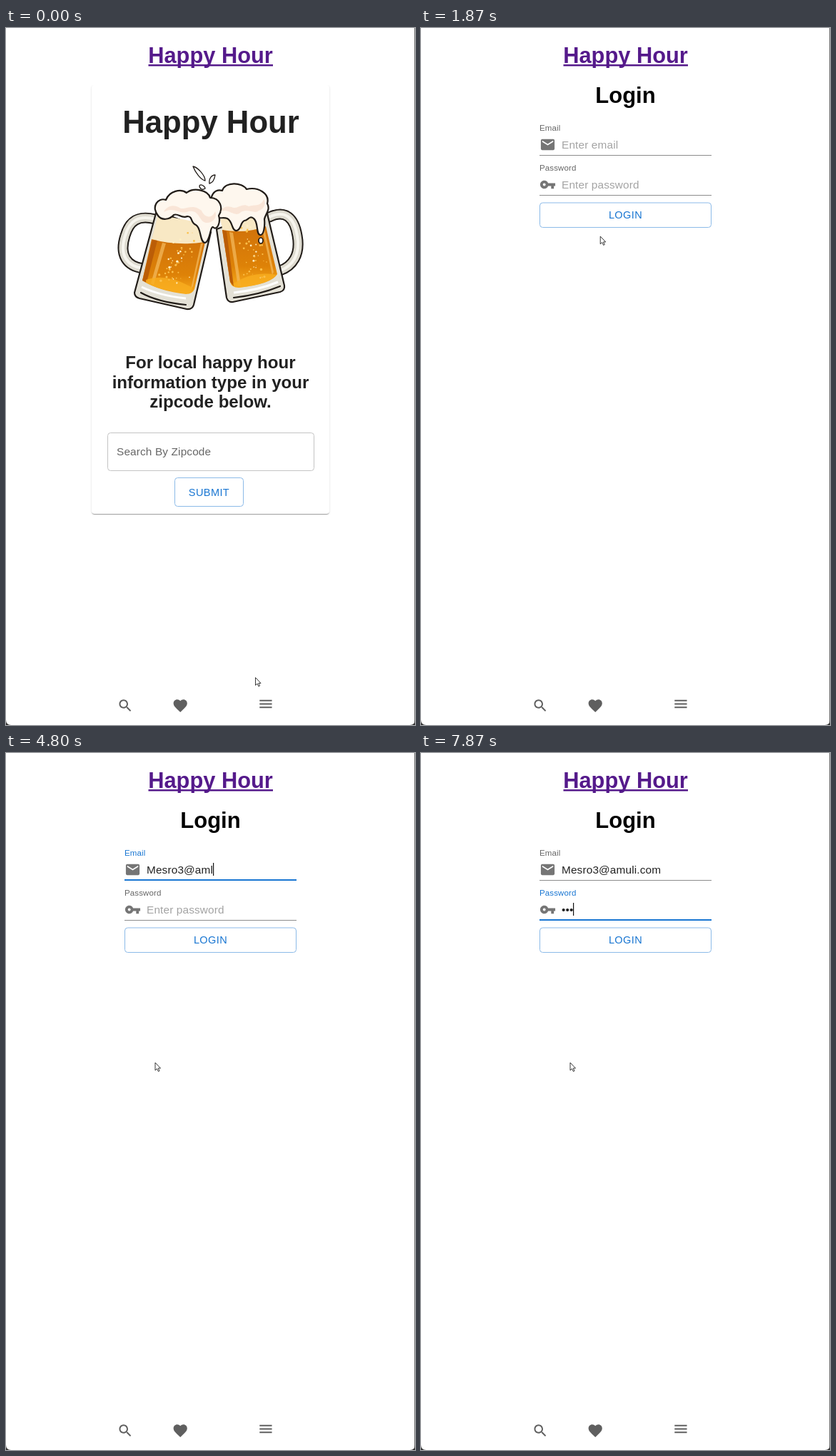
Write an HTML page that moves like this. It is 573 by 977 pixels and loops after 8000 ms.

```html
<!DOCTYPE html>
<html lang="en">
<head>
<meta charset="utf-8">
<title>Happy Hour</title>
<style>
html, body { margin: 0; width: 100%; height: 100%; overflow: hidden; background: #fff; }
svg { position: absolute; left: 0; top: 0; display: block; }
text { font-family: "Liberation Sans", Arial, sans-serif; white-space: pre; }
.bold { font-weight: 700; text-anchor: middle; }
.input { font-size: 15.36px; letter-spacing: .00938em; }
.label { font-size: 11.52px; letter-spacing: .00938em; }
.btn { font-size: 14.5px; letter-spacing: .02857em; text-anchor: middle; fill: #1976d2; }
.ui { font-family: "Open Sans", "Noto Sans", sans-serif; fill: #fff; }
.box { fill: none; stroke: #8cbae8; }
.ink { stroke: #211c18; stroke-width: 2.2; stroke-linejoin: round; stroke-linecap: round; }
#card { position: absolute; left: 120px; top: 80px; width: 333px; height: 601px; border-radius: 4px;
  box-shadow: 0 2px 1px -1px rgba(0,0,0,.2), 0 1px 1px rgba(0,0,0,.14), 0 1px 3px rgba(0,0,0,.12); }
#cover { position: absolute; left: 110px; top: 70px; width: 353px; height: 10px; background: #fff; }
</style>
</head>
<body>
<div id="home"><div id="card"></div><div id="cover"></div></div>
<svg id="stage" width="573" height="977" viewBox="0 0 573 977">
  <defs>
    <linearGradient id="beer" x1="0" y1="0" x2="0" y2="1">
      <stop offset="0" stop-color="#d0720a"/><stop offset=".65" stop-color="#de8207"/><stop offset="1" stop-color="#f8ab1c"/>
    </linearGradient>
    <filter id="drop" x="-10%" y="-10%" width="120%" height="125%">
      <feDropShadow dx="0" dy="2" stdDeviation="2" flood-opacity=".35"/>
    </filter>
  </defs>

  <text class="bold" x="286.5" y="49" font-size="30.8" fill="#551a8b">Happy Hour</text>
  <path d="M199.5 52.3H374" stroke="#551a8b" stroke-width="2.6"/>

  <g id="homeArt">
    <text class="bold" x="287" y="147" font-size="43.7" fill="#212121">Happy Hour</text>
    <g class="ink" fill="#fff" stroke-width="1.6">
      <path d="M262 194C268 195 279 206 279 214C273 213 265 202 262 194ZM285 218C284 211 288 206 293 206C292 213 289 217 285 218ZM271 221C273 218 279 222 279 225C275 228 271 225 271 221Z" style="stroke-width:1.3"/>
    </g>

    <g fill="none" stroke-linecap="round">
      <g id="handles"></g>
    </g>

    <!-- left glass -->
    <path class="ink" fill="#e4e1d6" d="M211 256L180 371Q180 377 187 379L253 394Q261 395 263 388L287 286Z"/>
    <path fill="#f8e8c4" d="M213 262L204 297Q240 306 278 301L284 275Z"/>
    <path fill="url(#beer)" d="M204 296Q240 306 279 300L264 366Q261 373 252 373Q215 369 191 354Z"/>
    <path fill="#bb5d07" d="M205 297L212 298L197 357L191 354Z"/>
    <path fill="#f3b85b" d="M219 301L224 302L207 360L203 358ZM273 302L276 302L262 362L259 366Z" opacity=".75"/>
    <path fill="#f9ae20" d="M196 353Q225 343 261 364Q259 373 250 372Q214 367 196 357Z" opacity=".8"/>
    <path fill="none" stroke="#fff" stroke-width="3" d="M190 363Q215 375 252 379"/>
    <path fill="none" class="ink" d="M189 371Q212 384 252 388"/>

    <!-- right glass -->
    <path class="ink" fill="#e4e1d6" d="M295 282L309 378Q311 385 318 384L384 370Q391 368 390 361L365 256Z"/>
    <path fill="#f8e8c4" d="M300 268L304 285Q335 289 362 279L360 258Z"/>
    <path fill="url(#beer)" d="M303 283Q335 289 364 278L380 345Q372 359 326 364Q316 364 314 356Z"/>
    <path fill="#bb5d07" d="M303 283L309 285L319 362L314 356Z"/>
    <path fill="#f3b85b" d="M313 286L318 287L329 361L325 362ZM359 282L362 281L375 342L373 346Z" opacity=".75"/>
    <path fill="#f9ae20" d="M318 359Q345 340 379 346Q370 359 326 364Z" opacity=".8"/>
    <path fill="none" stroke="#fff" stroke-width="3" d="M319 371Q355 367 381 356"/>
    <path fill="none" class="ink" d="M319 378Q355 374 384 362"/>
    <g id="bubbles"></g>

    <!-- foam -->
    <path class="ink" fill="#fef7ee" d="M289 262C282 240 290 224 303 228C307 215 331 216 337 226C353 222 370 232 366 246C371 255 363 261 362 268C363 278 361 291 356 290C350 289 354 272 347 267C341 262 339 270 334 270C328 272 330 283 323 284C316 285 318 271 310 267C303 264 297 270 289 262Z"/>
    <path class="ink" fill="#fef7ee" d="M213 263C203 250 213 237 224 241C229 228 245 225 253 231C263 223 283 227 286 238C300 238 305 252 298 263C301 272 296 285 290 279C286 278 286 299 279 301C271 301 274 280 266 276C258 273 262 264 254 264C246 268 241 259 235 262C229 269 218 270 213 263Z"/>
    <path fill="#f8dfce" d="M221 258C235 249 244 263 256 257C271 254 270 271 280 273C292 274 296 263 293 257C289 268 278 266 274 256C262 246 253 254 245 253C236 246 225 249 221 258ZM301 258C310 251 320 266 328 259C338 251 348 262 354 256C365 253 363 241 361 240C357 251 348 247 340 250C331 244 324 255 316 251C309 249 303 251 301 258Z" opacity=".7"/>
    <ellipse class="ink" fill="#fff" cx="357" cy="298" rx="3" ry="4" style="stroke-width:1.7"/>

    <g class="bold" font-size="24.1" fill="#212121">
      <text x="286.5" y="477">For local happy hour</text>
      <text x="286.5" y="504.7">information type in your</text>
      <text x="286.5" y="532.4">zipcode below.</text>
    </g>
    <rect class="box" x="142.5" y="567.5" width="289" height="53" rx="4" style="stroke:#c4c4c4"/>
    <text class="input" x="155" y="599" fill="#666">Search By Zipcode</text>
    <rect class="box" x="236.5" y="630.5" width="96" height="40" rx="4"/>
    <text class="btn" x="284.5" y="656">SUBMIT</text>
  </g>

  <g id="login">
    <text class="bold" x="286.5" y="105" font-size="31" fill="#000">Login</text>
    <g fill="#757575">
      <path transform="translate(166 152) scale(.96)" d="M20 4H4c-1.1 0-2 .9-2 2v12c0 1.1.9 2 2 2h16c1.1 0 2-.9 2-2V6c0-1.1-.9-2-2-2zm0 4l-8 5-8-5V6l8 5 8-5z"/>
      <path transform="translate(166 208) scale(.96)" d="M12.65 10C11.83 7.67 9.61 6 7 6c-3.31 0-6 2.69-6 6s2.69 6 6 6c2.61 0 4.83-1.67 5.65-4H17v4h4v-4h2v-4zM7 14c-1.1 0-2-.9-2-2s.9-2 2-2 2 .9 2 2-.9 2-2 2z"/>
    </g>
    <text class="label" id="emailLabel" x="166" y="144">Email</text>
    <text class="label" id="passLabel" x="166" y="200">Password</text>
    <text class="input" id="email" x="197" y="169"></text>
    <text class="input" id="pass" x="197" y="225"></text>
    <rect id="emailLine" x="166" width="241"/>
    <rect id="passLine" x="166" width="241"/>
    <rect id="caret" width="1.2" height="18" fill="#111"/>
    <rect class="box" x="166.5" y="245" width="240" height="34.5" rx="4"/>
    <text class="btn" x="286.5" y="266.5">LOGIN</text>
  </g>

  <g id="list">
    <g fill="#292a2b" filter="url(#drop)">
      <path d="M294 188L302.5 180L311 188Z"/>
      <rect id="panel" x="282" y="187.5" width="150" rx="4"/>
    </g>
    <g id="rows"></g>
  </g>

  <g fill="#5f5f5f">
    <path transform="translate(155.6 938.4) scale(.96)" d="M15.5 14h-.79l-.28-.27C15.41 12.59 16 11.11 16 9.5 16 5.91 13.09 3 9.5 3S3 5.91 3 9.5 5.91 16 9.5 16c1.61 0 3.09-.59 4.23-1.57l.27.28v.79l5 4.99L20.49 19zm-6 0C7.01 14 5 11.99 5 9.5S7.01 5 9.5 5 14 7.01 14 9.5 11.99 14 9.5 14z"/>
    <path transform="translate(232.7 938.4) scale(.96)" d="M12 21.35l-1.45-1.32C5.4 15.36 2 12.28 2 8.5 2 5.42 4.42 3 7.5 3c1.74 0 3.41.81 4.5 2.09C13.09 3.81 14.76 3 16.5 3 19.58 3 22 5.42 22 8.5c0 3.78-3.4 6.86-8.55 11.54z"/>
    <path transform="translate(352.4 936) scale(.96)" d="M3 18h18v-2H3zm0-5h18v-2H3zm0-7v2h18V6z"/>
  </g>

  <path d="M572.5 0V977" stroke="#777"/>
  <path d="M0 970Q0 977 7 977H0ZM573 970Q573 977 566 977H573Z" fill="#333"/>
  <g id="status">
    <path d="M0 956H111Q116 956 116 961V977H0Z" fill="#000"/>
    <text class="ui" x="4" y="971" font-size="11.1">localhost:3000/login</text>
  </g>
  <path id="mouse" d="M.5 .5V11.3L3 9L4.9 12.9L6.5 12.1L4.8 8.4H8Z" fill="#fff" stroke="#222" stroke-width=".9"/>
</svg>
<script>
const LOOP = 8000, SWITCH = 1130, FOCUS = 2130, TAB = 7330, LAG = 60;
const $ = id => document.getElementById(id);
const set = (id, attrs) => { for (const k in attrs) $(id).setAttribute(k, attrs[k]); };
const show = (id, on) => { $(id).style.display = on ? '' : 'none'; };

const NAMES = ['7', 'Mesro2', 'Mesro1', 'leso1', 'Vebu1', 'Mesro3'].map(n => n + '@amuli.com');

// typed characters with the time of each; "<" is backspace
const KEYS = 'Mesro3@amlui.co<<<<<<uli.com';
const TIMES = [3000, 3330, 3400, 3670, 3730, 4070, 4270, 4530, 4600, 4730, 4870, 4930, 5070, 5200, 5330,
  5530, 5730, 5930, 6130, 6270, 6330, 6530, 6600, 6730, 6870, 6930, 7070, 7200];
const DOTS = [7600, 7730, 7870];
const BLINKS = [[2600, 2800], [3930, 4070]];

// time, x, y of the pointer tip
const PATH = [[0, 349, 910], [70, 349, 910], [270, 362, 944], [530, 360, 940], [870, 348, 893], [930, 330, 882],
  [1130, 337, 863], [1330, 337, 863], [1600, 300, 620], [1930, 240, 220], [2070, 229, 164], [2130, 228, 166],
  [2400, 208.5, 433.5], [8000, 208.5, 433.5]];

function typed(t) {
  let s = '';
  for (let i = 0; i < KEYS.length && TIMES[i] <= t; i++)
    s = KEYS[i] === '<' ? s.slice(0, -1) : s + KEYS[i];
  return s;
}

function pointer(t) {
  const i = Math.max(1, PATH.findIndex(p => p[0] > t));
  const [a, b] = [PATH[i - 1], PATH[i]];
  const k = (t - a[0]) / (b[0] - a[0]);
  return [a[1] + (b[1] - a[1]) * k, a[2] + (b[2] - a[2]) * k];
}

function field(id, text, hint, y, active) {
  const el = $(id), value = text || hint;
  if (el.textContent !== value) el.textContent = value;
  el.setAttribute('fill', text ? '#212121' : '#a3a3a3');
  set(id + 'Label', { fill: active ? '#1976d2' : '#666' });
  set(id + 'Line', { y: active ? y - 1 : y, height: active ? 2 : 1, fill: active ? '#1976d2' : '#8c8c8c' });
  return 197 + (text ? el.getComputedTextLength() : 0);
}

let shown = '';
function suggest(list) {
  show('list', list.length);
  const key = list.join();
  if (key === shown) return;
  shown = key;
  set('panel', { height: 8.5 + 34.7 * list.length });
  $('rows').innerHTML = list.map((n, i) =>
    `<text class="ui" x="293" y="${213.7 + 34.7 * i}" font-size="12">${n}</text>`).join('');
}

function draw(now) {
  const t = now % LOOP, login = t >= SWITCH;
  show('home', !login);
  show('homeArt', !login);
  show('login', login);
  show('status', t >= 800 && t < 1530);
  set('mouse', { transform: `translate(${pointer(t)})` });

  const onEmail = t >= FOCUS && t < TAB, onPass = t >= TAB;
  const ends = [
    field('email', typed(t), 'Enter email', 178, onEmail),
    field('pass', '•'.repeat(DOTS.filter(d => d <= t).length), 'Enter password', 234, onPass)
  ];
  const hidden = BLINKS.some(([a, b]) => t >= a && t < b);
  show('caret', (onEmail || onPass) && !hidden);
  set('caret', { x: Math.floor(ends[+onPass]), y: onPass ? 210 : 154 });

  const prefix = typed(t - LAG);
  suggest(onEmail ? NAMES.filter(n => n.startsWith(prefix)) : []);
  requestAnimationFrame(() => draw(performance.now() - start));
}

function decorate() {
  const curves = ['M209 268C185 262 173 270 167 291C158 319 170 334 192 337',
    'M369 265C392 254 404 267 408 291C413 318 401 334 384 340'];
  const coats = [['#211c18', 15], ['#dedbd0', 11], ['#f7f5ee', 4]];
  $('handles').innerHTML = curves.map(d => coats.map(([c, w]) =>
    `<path d="${d}" stroke="${c}" stroke-width="${w}"/>`).join('')).join('');

  let seed = 11;
  const rnd = () => (seed = seed * 16807 % 2147483647) / 2147483647;
  let out = '';
  for (let i = 0; i < 90; i++) {
    const left = i % 2, v = rnd(), u = (rnd() + rnd()) / 2;
    const x = left ? 222 - v * 14 + u * 50 : 316 + v * 12 + u * 46;
    const y = left ? 286 + v * 75 : 272 + v * 78;
    out += `<circle cx="${x.toFixed(1)}" cy="${y.toFixed(1)}" r="${(.5 + rnd() * 1.2).toFixed(1)}" fill="${i % 3 ? '#fbc04a' : '#fff0c4'}"/>`;
  }
  $('bubbles').innerHTML = out;
}

decorate();
const start = performance.now();
draw(0);
</script>
</body>
</html>
```
